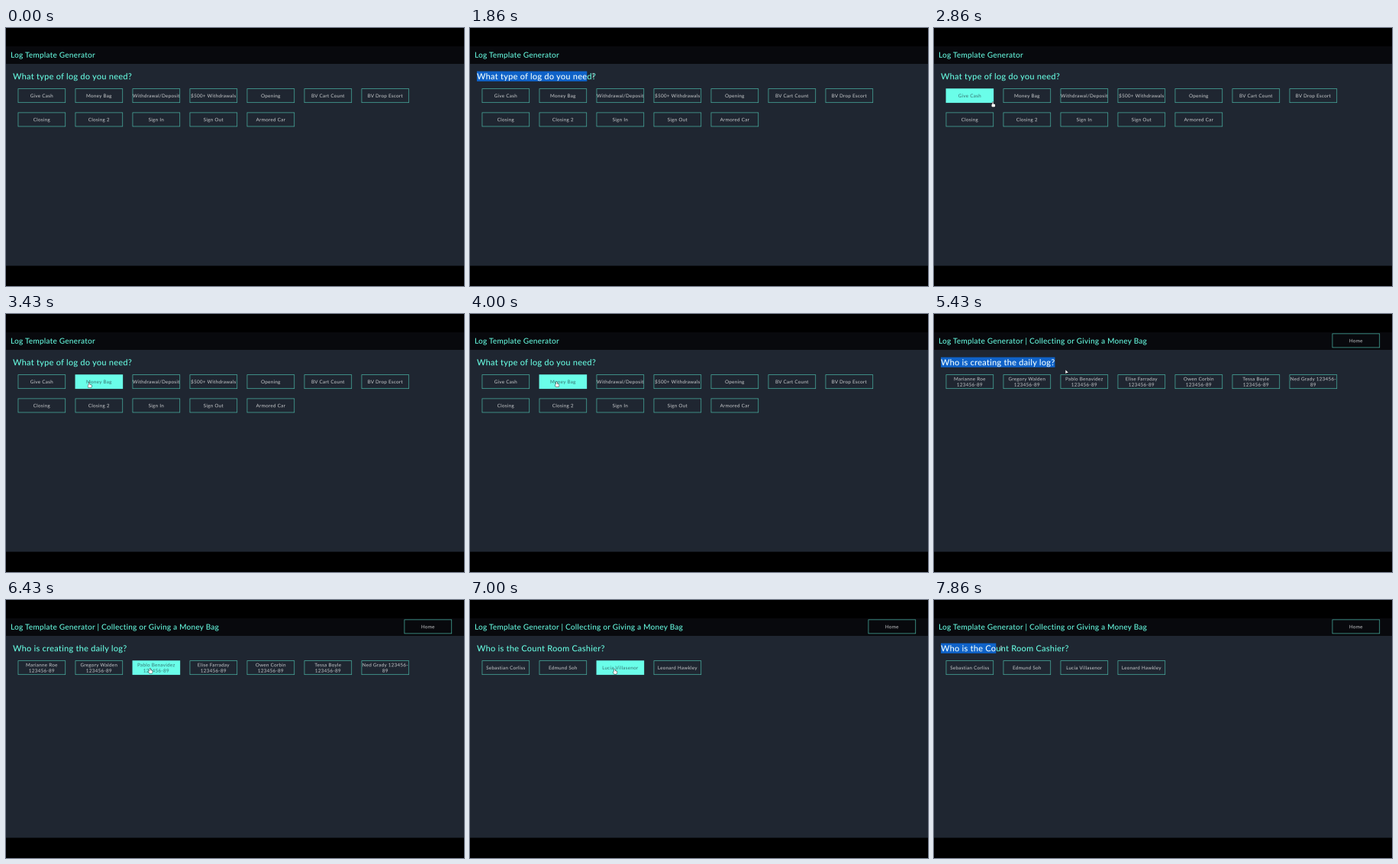
Animation of 600x338 px, one loop 8 s. Source, as an HTML page with a canvas:

```html
<!DOCTYPE html>
<html lang="en">
<head>
<meta charset="utf-8">
<title>Log Template Generator</title>
<style>
html, body { margin: 0; width: 100%; height: 100%; overflow: hidden; background: #000; }
canvas { display: block; width: 600px; height: 338px; }
</style>
</head>
<body>
<canvas id="stage"></canvas>
<script>
const W = 600, H = 338, LOOP = 8000, TICKS = 56;
const FINE = 4; // the scene is drawn large, then reduced like a screen recording
const stage = document.getElementById('stage');
const ratio = window.devicePixelRatio || 1;
stage.width = W * ratio;
stage.height = H * ratio;
const out = stage.getContext('2d');
out.imageSmoothingQuality = 'high';

const scene = document.createElement('canvas');
scene.width = W * FINE;
scene.height = H * FINE;
const ctx = scene.getContext('2d');
ctx.scale(FINE, FINE);

const color = {
  header: '#08090d', body: '#1f2631', accent: '#66fae0', fill: '#6afee9',
  border: '#4cb8a8', label: '#cdcfd1', pressed: '#35706f',
  select: '#0f62c8', selected: '#f2ffff'
};
const font = {
  title: { size: 10, weight: 500, spacing: 0.25 },
  heading: { size: 11, weight: 500, spacing: 0.25 },
  button: { size: 6.25, weight: 400, spacing: 0.3 }
};
const box = { w: 62.5, h: 18.75, gap: 12.5, left: 15.6, top: 79.3, columns: 7 };

const people = ['Marianne Roe', 'Gregory Walden', 'Pablo Benavidez',
  'Elise Farraday', 'Owen Corbin', 'Tessa Boyle'];
const flow = 'Log Template Generator | Collecting or Giving a Money Bag';

// drag: ticks at which selecting starts, stops and is cleared
const pages = [
  {
    from: 0, title: 'Log Template Generator', heading: 'What type of log do you need?',
    drag: { start: 9, stop: 13, clear: 15 },
    buttons: ['Give Cash', 'Money Bag', 'Withdrawal/Deposit', '$500+ Withdrawals', 'Opening',
      'BV Cart Count', 'BV Drop Escort', 'Closing', 'Closing 2', 'Sign In', 'Sign Out', 'Armored Car']
  },
  {
    from: 30, title: flow, heading: 'Who is creating the daily log?', home: true,
    drag: { start: 33, stop: 36, clear: 42 },
    buttons: [...people.map(name => name + '\n123456-89'), 'Ned Grady 123456-\n89']
  },
  {
    from: 49, title: flow, heading: 'Who is the Count Room Cashier?', home: true,
    drag: { start: 53, stop: 55, clear: TICKS },
    buttons: ['Sebastian Corliss', 'Edmund Soh', 'Lucia Villasenor', 'Leonard Hawkley']
  }
];

const place = (x, y) => ({ x, y });
const textStart = place(9, 64), textEnd = place(161.5, 62), bag = place(113, 89);
const moves = [
  { at: 1, to: place(0, 226) },
  { at: 8, to: textStart },
  { at: 9, to: textStart },
  { at: 13, to: textEnd },
  { at: 20, to: place(76.5, 97) },
  { at: 28, to: bag },
  { at: 30, to: bag },
  { at: 33, to: textStart },
  { at: 36, to: textEnd },
  { at: 49, to: place(189, 90.5) },
  { at: 53, to: textStart },
  { at: 55, to: place(88, 63) }
];

const easeOut = k => 1 - (1 - k) ** 3;

function pointerAt(tick) {
  const i = moves.findIndex(move => move.at >= tick);
  if (i === 0) return tick < moves[0].at ? null : moves[0].to;
  const a = moves[i - 1], b = moves[i];
  const k = easeOut((tick - a.at) / (b.at - a.at));
  return place(a.to.x + (b.to.x - a.to.x) * k, a.to.y + (b.to.y - a.to.y) * k);
}

function setFont({ size, weight, spacing }) {
  ctx.font = `${weight} ${size * FINE}px Lato, sans-serif`;
  ctx.letterSpacing = spacing * FINE + 'px';
  ctx.textRendering = 'geometricPrecision';
}

function text(str, x, y, style, fill, align = 'left') {
  ctx.save();
  ctx.scale(1 / FINE, 1 / FINE);
  setFont(style);
  ctx.textAlign = align;
  ctx.fillStyle = fill;
  ctx.fillText(str, x * FINE, y * FINE);
  ctx.restore();
}

function widthOf(str, style) {
  setFont(style);
  return ctx.measureText(str).width / FINE;
}

function rect(x, y, w, h, fill) {
  ctx.fillStyle = fill;
  ctx.fillRect(x, y, w, h);
}

function drawButton(label, x, y, hover) {
  if (hover) rect(x, y, box.w, box.h, color.fill);
  ctx.strokeStyle = hover ? color.fill : color.border;
  ctx.lineWidth = 0.7;
  ctx.strokeRect(x + 0.35, y + 0.35, box.w - 0.7, box.h - 0.7);
  const lines = label.split('\n');
  lines.forEach((line, i) => {
    const offset = (i - (lines.length - 1) / 2) * 7.5;
    text(line, x + box.w / 2, y + 11.8 + offset, font.button,
      hover ? color.pressed : color.label, 'center');
  });
}

function drawHeading({ heading, drag }, tick) {
  const { x } = textStart, y = 67.3;
  text(heading, x, y, font.heading, color.accent);
  if (tick < drag.start || tick >= drag.clear) return;
  const edge = pointerAt(Math.min(tick, drag.stop)).x - 3;
  let width = 0;
  for (let n = 1; n <= heading.length; n++) {
    const w = widthOf(heading.slice(0, n), font.heading);
    if (x + w > edge) break;
    width = w;
  }
  ctx.save();
  ctx.beginPath();
  ctx.rect(x, 56.6, width, 13.3);
  ctx.clip();
  rect(x, 56, width, 15, color.select);
  text(heading, x, y, font.heading, color.selected);
  ctx.restore();
}

function paintCursor(shape) {
  ctx.lineJoin = 'round';
  ctx.lineWidth = 0.9;
  ctx.strokeStyle = '#15181c';
  ctx.stroke(shape);
  ctx.fillStyle = '#fff';
  ctx.fill(shape);
}

const arrow = new Path2D('M0 0V5L1.4 3.8 3.5 3.6Z');
const hand = new Path2D();
hand.roundRect(0, 0, 1.2, 4, 0.6);
hand.roundRect(-1, 2.6, 4.6, 3.8, 1.2);

function drawBeam() {
  ctx.strokeStyle = '#c9d0d4';
  ctx.lineWidth = 0.6;
  ctx.stroke(new Path2D('M-1 -2.5H1M0 -2.5V2.5M-1 2.5H1'));
}

function drawPointer({ x, y }, hovering, heading) {
  const overText = y > 57 && y < 70 && x >= textStart.x &&
    x < textStart.x + widthOf(heading, font.heading) - 1;
  ctx.save();
  ctx.translate(x, y);
  if (hovering) paintCursor(hand);
  else if (overText) drawBeam();
  else paintCursor(arrow);
  ctx.restore();
}

function draw(tick) {
  const page = pages.findLast(p => tick >= p.from);
  const pointer = pointerAt(tick);
  rect(0, 0, W, H, '#000');
  rect(0, 24, W, 23, color.header);
  rect(0, 47, W, 264.5, color.body);

  text(page.title, 6, 38.8, font.title, color.accent);
  if (page.home) drawButton('Home', 521.6, 25.5, false);
  drawHeading(page, tick);

  let hovering = false;
  page.buttons.forEach((label, i) => {
    const x = box.left + (box.w + box.gap) * (i % box.columns);
    const y = box.top + (box.h + box.gap) * Math.floor(i / box.columns);
    const hover = pointer !== null && pointer.x >= x && pointer.x < x + box.w &&
      pointer.y >= y && pointer.y < y + box.h;
    hovering = hovering || hover;
    drawButton(label, x, y, hover);
  });
  if (pointer) drawPointer(pointer, hovering, page.heading);

  out.drawImage(scene, 0, 0, stage.width, stage.height);
}

function frame() {
  const time = performance.now() % LOOP;
  draw(Math.floor((time + 4) * TICKS / LOOP) % TICKS);
  requestAnimationFrame(frame);
}
frame();
</script>
</body>
</html>
```
